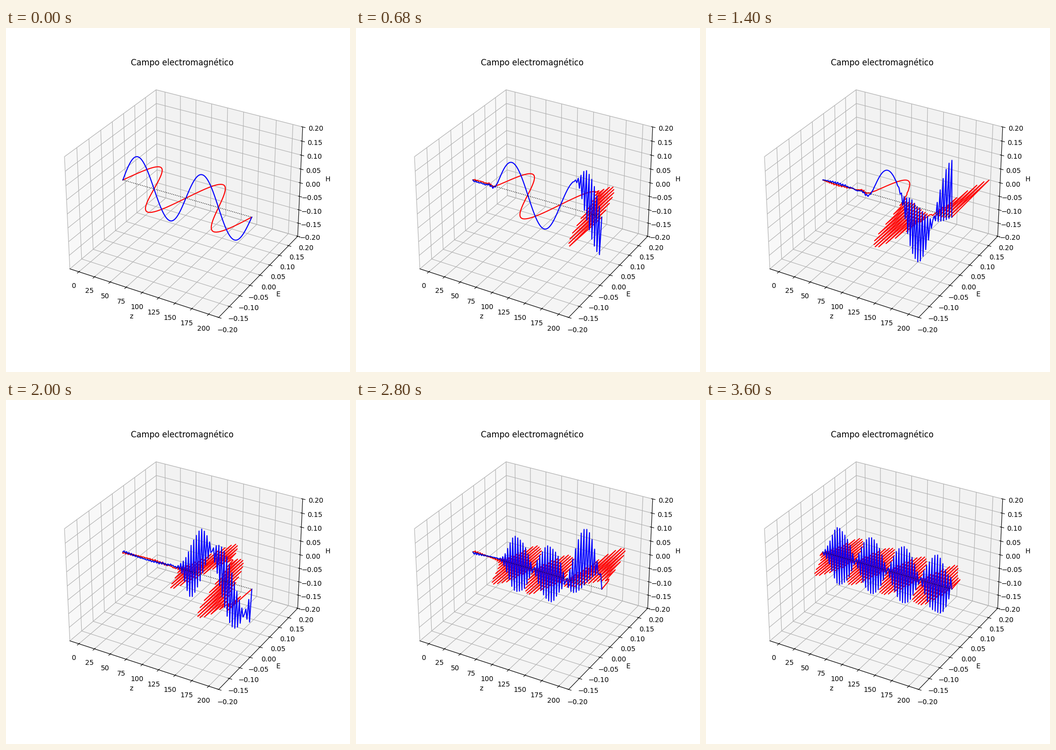
A matplotlib script for the animation above (3.64 s loop, 700 by 700 pixels).

```python
import numpy as np
import matplotlib.pyplot as plt
from matplotlib.animation import FuncAnimation

LENGTH = 200
STEP = 2
COURANT = 1.1
AMPLITUDE = 0.1
FRAMES = 91
INTERVAL = 40

z = np.arange(0, LENGTH + STEP, STEP)


def centred(field):
    return (field[2:] - field[:-2]) / 2


def propagate():
    """Electric and magnetic fields for every frame, both ends held fixed."""
    e = AMPLITUDE * np.sin(2 * np.pi * z / 100)
    h = e.copy()
    states = []
    for _ in range(FRAMES):
        states.append((e.copy(), h.copy()))
        e[1:-1] -= COURANT * centred(h)
        h[1:-1] -= COURANT * centred(e)
    return states


states = propagate()

fig = plt.figure(figsize=(7, 7), dpi=100)
ax = fig.add_subplot(projection="3d")
ax.set_title("Campo electromagnético")
ax.set_xlabel("z")
ax.set_ylabel("E")
ax.set_zlabel("H")

zero = np.zeros(len(z))
electric, = ax.plot(z, states[0][0], zero, color="red")
magnetic, = ax.plot(z, zero, states[0][1], color="blue")
ax.plot([0, LENGTH], [0, 0], [0, 0], color="black", linestyle=":", linewidth=1)
ax.set_ylim(-0.2, 0.2)
ax.set_zlim(-0.2, 0.2)


def update(frame):
    e, h = states[frame]
    electric.set_data_3d(z, e, zero)
    magnetic.set_data_3d(z, zero, h)
    return electric, magnetic


anim = FuncAnimation(fig, update, frames=FRAMES, interval=INTERVAL,
                     repeat=True, repeat_delay=0, blit=False)
plt.show()
```
